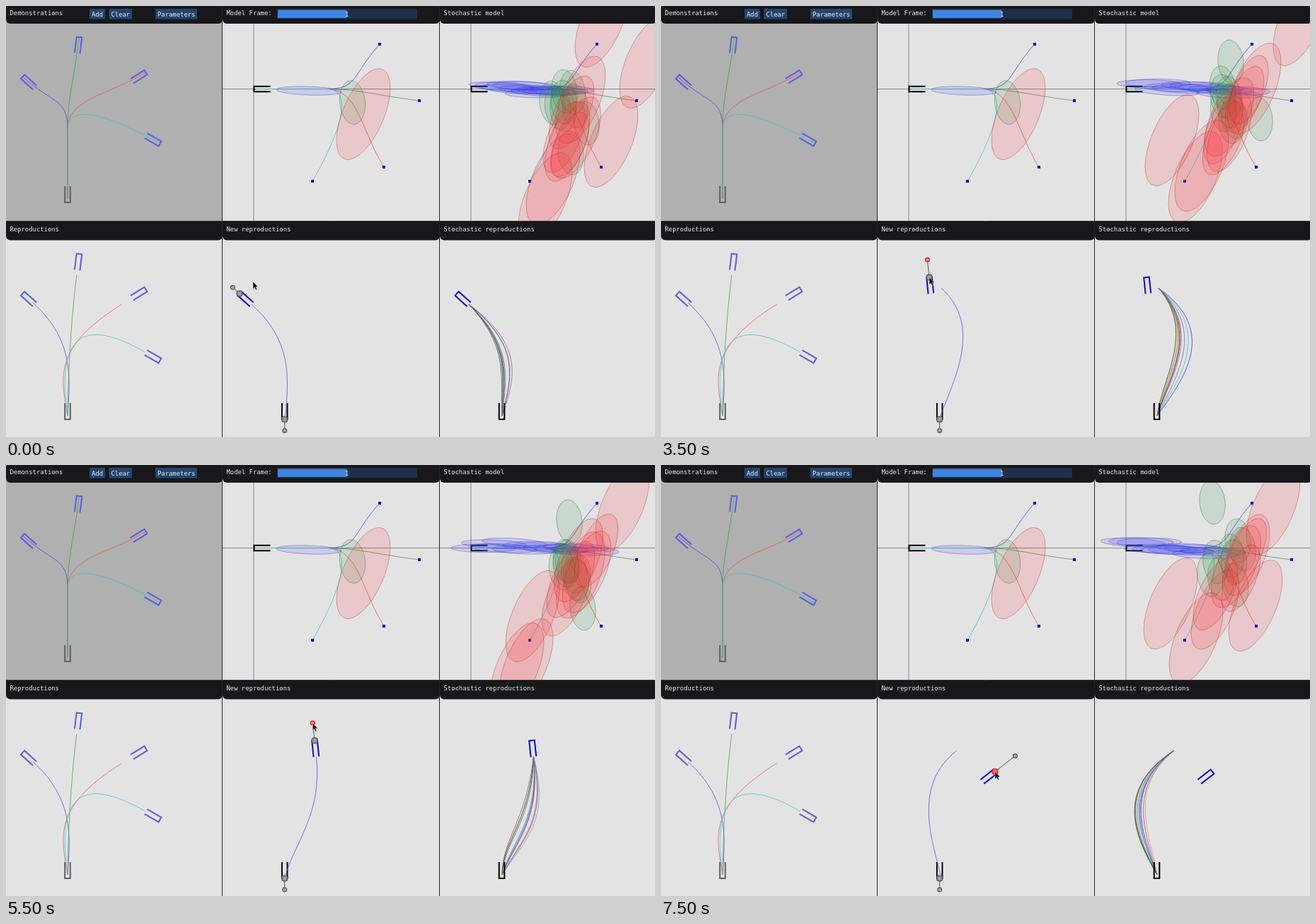
Animation of 917 by 610 pixels, one loop 8 s. Source, as an HTML page with a canvas:

```html
<!DOCTYPE html>
<html lang="en">
<head>
<meta charset="utf-8">
<title>Demonstrations and reproductions</title>
<style>
html, body { margin: 0; width: 100%; height: 100%; overflow: hidden; background: #e4e3e4; }
canvas { display: block; }
</style>
</head>
<body>
<canvas id="stage" width="917" height="610"></canvas>
<script>
const ctx = document.getElementById('stage').getContext('2d');
const SHIFT = 307, STEP = 500, STEPS = 16, LENGTH = 23;
const LIGHT = '#e4e3e4', TOOL = '#0a0ad0';
const LINES = ['#4a4ae4', '#4a9c54', '#e4584e', '#3cc8bc'];
const BUNDLE = ['#e0443c', '#2f9a50', '#2a2ae0', '#2cc4b8', '#a040b0', '#222', '#c8a83c', '#1c7a3c', '#9a4038', '#6060d8'];

// closed end, direction of the open end in degrees, gap to the reproduced path, pull of its tangent
const goals = [
  { x: 23.5, y: 100, angle: 42, gap: 20, pull: 80 },
  { x: 103.5, y: 44, angle: 97, gap: 30, pull: 80 },
  { x: 197.5, y: 94, angle: 148, gap: 40, pull: 120 },
  { x: 217.5, y: 195, angle: 210, gap: 24, pull: 150 }
];

const KINDS = {
  red: { rx: 29, ry: 69, turn: 23, rgb: '255,40,48', edge: '170,50,50' },
  green: { rx: 18, ry: 31, turn: -6, rgb: '40,140,60', edge: '40,100,60' },
  blue: { rx: 46, ry: 6, turn: 2, rgb: '60,60,255', edge: '60,60,190' }
};

// each fit starts at a step; a few outlying centres and the extent of the blue band
const fits = [
  { from: 0, red: [[842, 22], [905, 80], [855, 192], [773, 245], [762, 272]], green: [[772, 137], [798, 208]], blue: [700, 785] },
  { from: 4, red: [[903, 20], [838, 117], [722, 190], [764, 226], [755, 242]], green: [[805, 79], [846, 160]], blue: [690, 815] },
  { from: 8, red: [[880, 70], [850, 128], [803, 263], [759, 212]], green: [[817, 73], [830, 155]], blue: [686, 790] },
  { from: 11, red: [[871, 58], [744, 214], [735, 282], [722, 288]], green: [[796, 80], [815, 203]], blue: [675, 820] },
  { from: 14, red: [[865, 62], [840, 199], [720, 196], [756, 245]], green: [[779, 53], [815, 107]], blue: [667, 780] }
];

const mix = (a, b, u) => a + (b - a) * u;
const ramp = (v, a, b) => Math.min(1, Math.max(0, (v - a) / (b - a)));
const rad = deg => deg * Math.PI / 180;
const along = ({ x, y, angle }, d) => [x + Math.cos(rad(angle)) * d, y + Math.sin(rad(angle)) * d];

function randomFrom(seed) {
  return () => {
    const v = Math.sin(seed++ * 127.1 + 11.7) * 43758.5453;
    return v - Math.floor(v);
  };
}

// the tool is dragged in three moves and turned twice
function poseAt(step) {
  const firstTurn = ramp(step, 5, 7), secondTurn = ramp(step, 11, 13);
  const drag1 = ramp(step, 1, 3), drag2 = ramp(step, 8, 10), drag3 = ramp(step, 14, 15);
  return {
    x: 330 + 49 * drag1 + 57 * drag2 + 36 * drag3,
    y: 407 - 23 * drag1 + 6 * drag2 + 44 * drag3,
    angle: 42 + 42 * firstTurn + 58 * secondTurn,
    knob: 13 + 12 * firstTurn + 11 * secondTurn,
    turn: step < 8 ? firstTurn : secondTurn,
    turning: (step > 4 && step < 8) || (step > 10 && step < 14)
  };
}

function rect(x, y, w, h, fill, radius = 0) {
  ctx.fillStyle = fill;
  ctx.beginPath();
  ctx.roundRect(x, y, w, h, radius);
  ctx.fill();
}

function stroke(color, width, trace) {
  ctx.strokeStyle = color;
  ctx.lineWidth = width;
  ctx.beginPath();
  trace();
  ctx.stroke();
}

const polyline = (pts, color, width = 1) =>
  stroke(color, width, () => pts.forEach(p => ctx.lineTo(...p)));

function label(text, x, y) {
  ctx.fillStyle = '#ececec';
  ctx.font = '8.9px "DejaVu Sans Mono", monospace';
  ctx.fillText(text, x, y);
}

function gripper({ x, y, angle }, color) {
  ctx.save();
  ctx.translate(x, y);
  ctx.rotate(rad(angle));
  polyline([[LENGTH, -3.8], [0, -3.8], [0, 3.8], [LENGTH, 3.8]], color, 2);
  ctx.restore();
}

function ellipse(kind, x, y, size = 1, tilt = 0) {
  const k = KINDS[kind];
  stroke(`rgba(${k.edge},.5)`, .8, () => ctx.ellipse(x, y, k.rx * size, k.ry * size, rad(k.turn + tilt), 0, 7));
  ctx.fillStyle = `rgba(${k.rgb},.14)`;
  ctx.fill();
}

function panel(col, row, title, fill) {
  const x = col * SHIFT - (col ? 1 : 0), y = row * 305, h = row ? 26.5 : 25;
  rect(x, y, SHIFT, 305, fill);
  rect(x, y, col ? SHIFT : SHIFT - 1, h, '#18171a', [0, 0, 6, 6]);
  label(title, x + 5.5, y + (row ? 14 : 12.5));
}

function button(text, x, w) {
  rect(x, 4, w, 14.5, '#21466f');
  label(text, x + 3, 15);
}

// straight up from the base, then a bend into the goal
function demonstrations() {
  goals.forEach((goal, i) => stroke(LINES[i], .8, () => {
    ctx.moveTo(87, 273);
    ctx.lineTo(87, 175);
    ctx.bezierCurveTo(87, 130, ...along(goal, 60), goal.x, goal.y);
  }));
}

// path from the base at x0 that arrives along the tool
function reproduction(x0, tool, gap, pull, color, swayLow = 0, swayHigh = 0) {
  const [ex, ey] = along(tool, gap), [px, py] = along(tool, gap + pull);
  stroke(color, .75, () => {
    ctx.moveTo(x0, 580);
    ctx.bezierCurveTo(mix(x0, px, .3) + swayLow, 530, px + swayHigh, py, ex, ey);
  });
}

// the demonstrations seen from the base, which points right here
function alignedModel(dx) {
  ctx.save();
  ctx.translate(dx, 0);
  polyline([[350, 25], [350, 304]], '#888');
  polyline([[306, 117.5], [613, 117.5]], '#888');
  gripper({ x: 350.5, y: 117.5, angle: 0 }, '#000');
  ctx.save();
  ctx.translate(350, 117.5);
  ctx.rotate(rad(90));
  ctx.translate(-87, -278);
  demonstrations();
  ctx.restore();
  goals.forEach(g => rect(626 - g.y, g.x + 28.5, 4, 4, '#0808c8'));
  ctx.restore();
}

function stochasticModel(fit) {
  const rnd = randomFrom(fit.from * 9 + 4), spread = r => (rnd() + rnd() - 1) * r;
  ctx.save();
  ctx.beginPath();
  ctx.rect(613, 25, 304, 279);
  ctx.clip();
  alignedModel(SHIFT);
  for (let i = 0; i < 11; i++) {
    const u = i / 10;
    ellipse('blue', mix(...fit.blue, u), 112 + 11 * u + spread(7), 1, spread(3));
  }
  fit.green.forEach(c => ellipse('green', ...c));
  for (let i = 0; i < 7; i++) ellipse('green', 796 + spread(28), 142 + spread(44), 1, spread(4));
  fit.red.forEach(c => ellipse('red', ...c));
  for (let i = 0; i < 6; i++) {
    const slide = spread(60);
    ellipse('red', 805 - slide * .4 + spread(18), 165 + slide, .7 + rnd() * .25, spread(4));
  }
  ctx.restore();
}

function bundle(fit, tool) {
  const rnd = randomFrom(fit.from + 40), pull = 92;
  const width = 10 + Math.abs(along(tool, LENGTH + pull)[0] - 394) * .14;
  BUNDLE.forEach(color => {
    const sway = (rnd() * 2 - 1) * width;
    reproduction(701, { ...tool, x: tool.x + SHIFT }, LENGTH, pull, color, sway, sway + rnd() * 8 - 4);
  });
}

function handle(x, y, r, on) {
  rect(x - r, y - r, 2 * r, 2 * r, on ? '#ff4a48' : '#8c8c8c', 2.5);
  ctx.strokeStyle = on ? '#d41818' : '#444';
  ctx.lineWidth = 1;
  ctx.stroke();
  rect(x - 1.5, y - 1.5, 3, 3, on ? '#f88' : '#aaa');
}

function handles(tool, dist, gripOn, knobOn) {
  const knob = along(tool, -dist);
  polyline([[tool.x, tool.y], knob], '#555');
  handle(tool.x, tool.y, 4, gripOn);
  handle(...knob, 3, knobOn);
  return knob;
}

function pointer(x, y) {
  ctx.save();
  ctx.translate(x, y);
  ctx.beginPath();
  [[0, 0], [0, 10.5], [2.4, 8.3], [4, 12], [5.6, 11.3], [4, 7.7], [7, 7.5]].forEach(p => ctx.lineTo(...p));
  ctx.closePath();
  ctx.fillStyle = '#000';
  ctx.fill();
  ctx.strokeStyle = '#f4f4f4';
  ctx.lineWidth = .5;
  ctx.stroke();
  ctx.restore();
}

function draw(step) {
  const pose = poseAt(step), fit = fits.findLast(f => f.from <= step);
  const fitted = poseAt(fit.from);

  panel(0, 0, 'Demonstrations', '#b0b0b0');
  panel(1, 0, 'Model Frame:', LIGHT);
  panel(2, 0, 'Stochastic model', LIGHT);
  panel(0, 1, 'Reproductions', LIGHT);
  panel(1, 1, 'New reproductions', LIGHT);
  panel(2, 1, 'Stochastic reproductions', LIGHT);
  button('Add', 118, 22);
  button('Clear', 145.5, 32.5);
  button('Parameters', 211, 59);
  rect(383, 4, 198, 14.5, '#1e304a');
  rect(384, 5.5, 97.5, 11.5, '#3d85e0');
  label('1', 479, 15);

  demonstrations();
  goals.forEach((goal, i) => {
    const lower = { ...goal, y: goal.y + SHIFT };
    reproduction(87, lower, goal.gap, goal.pull, LINES[i]);
    gripper(goal, '#5c5ce4');
    gripper(lower, '#5c5ce4');
  });
  [278, 585].forEach(y => gripper({ x: 87, y, angle: -90 }, '#606060'));

  alignedModel(0);
  ellipse('blue', 428, 120);
  ellipse('green', 489.5, 136.5);
  ellipse('red', 505, 153);
  stochasticModel(fit);

  polyline([[305.5, 0], [305.5, 610]], '#222');
  polyline([[612.5, 0], [612.5, 610]], '#222');
  polyline([[0, 304.5], [917, 304.5]], '#333');

  const base = { x: 393.7, y: 585, angle: -90 };
  gripper(base, '#08080c');
  reproduction(395, fitted, LENGTH, 80, LINES[0]);
  handles(base, 16);
  gripper(pose, TOOL);
  const knob = handles(pose, pose.knob, step > 0 && !pose.turning, pose.turning);
  bundle(fit, fitted);
  gripper({ ...base, x: 700.5 }, '#000');
  gripper({ ...pose, x: pose.x + SHIFT }, TOOL);

  // the pointer falls back from the knob to the grip during a turn
  const back = pose.turning ? pose.turn : 1, away = 1 - ramp(step, 0, 1);
  pointer(mix(knob[0], pose.x, back) + 19 * away, mix(knob[1], pose.y, back) - 17 * away);
}

let shown = -1;
function tick(now) {
  const step = Math.floor(now / STEP) % STEPS;
  if (step !== shown) draw(shown = step);
  requestAnimationFrame(tick);
}
draw(0);
requestAnimationFrame(tick);
</script>
</body>
</html>
```
